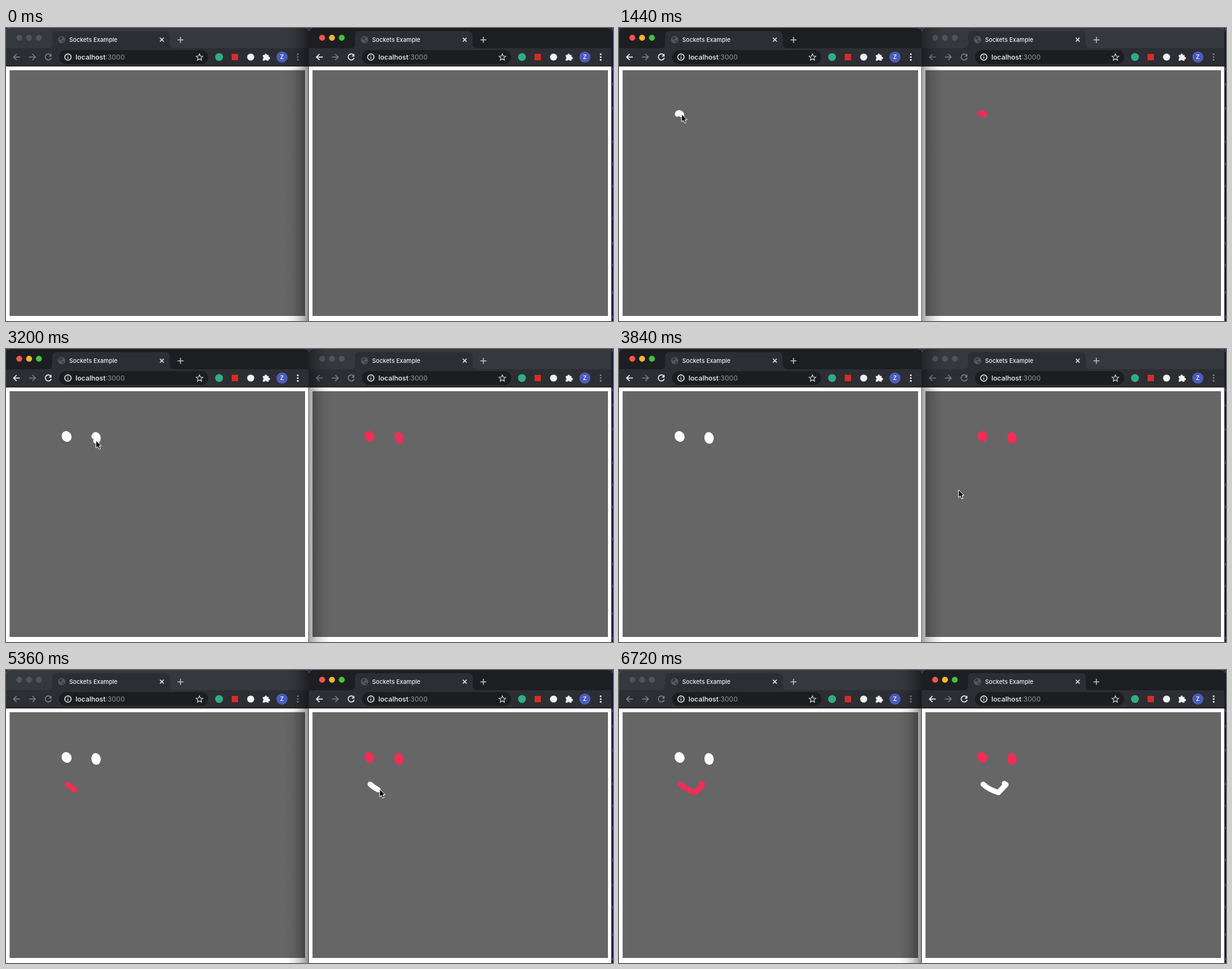
Animation of 960x464 px, one loop 6.8 s. Source, as an HTML page:

```html
<!DOCTYPE html>
<html lang="en">
<head>
<meta charset="utf-8">
<title>Sockets Example</title>
<style>
  html, body { margin: 0; width: 100%; height: 100%; overflow: hidden; background: #17142b; }
  svg { display: block; width: 960px; height: 464px; }
  text { font-family: Inter, Roboto, sans-serif; font-weight: 500; }
  .line { fill: none; stroke-width: 1.5; }
  .mark { fill: none; stroke-width: 8.4; stroke-linecap: round; stroke-linejoin: round; }
</style>
</head>
<body>
<svg id="stage" viewBox="0 0 960 464"></svg>
<script>
const LOOP = 6800, STEP = 80, SHIFT = 479;
const RED = '#f22d56', WHITE = '#fff';
const stage = document.getElementById('stage');

const clamp = v => Math.min(1, Math.max(0, v));
const ease = u => u * u * (3 - 2 * u);
const mix = (a, b, u) => a + (b - a) * u;
const repeat = (n, make) => Array.from({ length: n }, (_, i) => make(i)).join('');

let seed = 7;
const random = () => (seed = seed * 16807 % 2147483647) / 2147483647;

// A scribbled dot: one slanted round that winds into its middle.
function scribble(cx, cy, rx, ry, slant) {
  const n = 24;
  return 'M' + Array.from({ length: n + 1 }, (_, i) => {
    const u = i / n, a = Math.PI * (1.1 + 3 * u);
    const r = Math.min(1, 2.6 * (1 - u));
    const x = cx + r * rx * Math.cos(a);
    const y = cy + r * (ry * Math.sin(a) + slant * Math.cos(a));
    return `${x.toFixed(1)} ${y.toFixed(1)}`;
  }).join('L');
}

// Drawn marks in page coordinates; owner is the window they are drawn in.
const marks = [
  { d: scribble(95.8, 138.5, 3.7, 4.1, 1), from: 1120, to: 2240, owner: 0 },
  { d: scribble(142.4, 140.8, 3.2, 5, .7), from: 2800, to: 3520, owner: 0 },
  { d: 'M97 181Q106 189.5 121 194L133 181.5L130.5 179.8', from: 4880, to: 6400, owner: 1 }
];

// Resting points of the cursor between marks: time, x, y.
const stops = [[80, 420, 440], [800, 89, 134], [2480, 95, 134], [3840, 537, 223], [4240, 570, 172], [6640, 690, 480]];

function windowMarkup(id) {
  const drawn = marks.map(m =>
    `<path class="mark" d="${m.d}" pathLength="1" stroke="${m.owner === id ? WHITE : RED}"/>`).join('');
  const lights = repeat(3, i => `<circle class="light" cx="${21 + 15.5 * i}" cy="15.5" r="4.7"/>`);
  const dots = repeat(3, i => `<circle cx="461.5" cy="${41.7 + 4.4 * i}" r="1.4"/>`);
  return `<g id="win${id}" transform="translate(${id * SHIFT})" clip-path="url(#frame)">
    <rect width="479" height="464" fill="#fff"/>
    <rect class="title" width="479" height="40"/>
    ${lights}
    <path d="M66 32Q73 32 73 25V12Q73 5 80 5H252Q259 5 259 12V25Q259 32 266 32Z" fill="#2d2e33"/>
    <rect y="32" width="479" height="28.5" fill="#2d2e33"/>
    <rect y="59.5" width="479" height="1.3" fill="#1b1c1f"/>
    <circle cx="88" cy="18.5" r="5.7" fill="#55585c"/>
    <path d="M84 16l3-2 3 1-2 3-3 1zM88 21l3-2 1 2-3 2z" fill="#35373b"/>
    <text x="100" y="22" font-size="9.35" fill="#eeeff0">Sockets Example</text>
    <path class="line" d="M243.5 15.5l6 6m0-6l-6 6" stroke="#e4e5e7"/>
    <path class="line" d="M276 14v9.4m-4.7-4.7h9.4" stroke="#b9bbbe"/>
    <path class="line nav" d="M22 46H12m4.8-4.8L12 46l4.8 4.8"/>
    <path class="line" d="M36.5 46h10m-4.8-4.8l4.8 4.8l-4.8 4.8" stroke="#7b7d82"/>
    <path class="line nav" d="M70.7 42.8A4.8 4.8 0 1 0 71.6 47.2"/>
    <path class="fill" d="M72 40.5v4.7h-4.7z"/>
    <rect x="84" y="35" width="236" height="22" rx="11" fill="#1c1d20"/>
    <circle class="line" cx="98" cy="46" r="5" stroke="#e4e5e7"/>
    <path d="M98 45.2v3.6M98 42.8v1.3" stroke="#e4e5e7" stroke-width="1.3"/>
    <text x="110" y="50" font-size="10.9" fill="#f6f7f8">localhost<tspan fill="#92959a" font-weight="400">:3000</tspan></text>
    <path d="M306 41l1.5 3.5 3.8.3-2.9 2.5.9 3.7-3.3-2-3.3 2 .9-3.7-2.9-2.5 3.8-.3z" fill="none" stroke="#d0d2d5" stroke-width="1.1"/>
    <circle cx="337" cy="46" r="6.2" fill="#2fae83"/>
    <rect x="357" y="41" width="10" height="10" fill="#d62d25"/>
    <circle cx="387" cy="46" r="5.6" fill="#f2f2f2"/>
    <path d="M406.2 42.8h3a1.8 1.8 0 1 1 3.4 0h2.8v3a1.8 1.8 0 1 1 0 3.5v2.4h-3a1.8 1.8 0 0 0-3.4 0h-2.8v-2.9a1.8 1.8 0 0 0 0-3.4z" fill="#f2f2f2"/>
    <circle cx="436.5" cy="46" r="8.8" fill="#4c5cbd"/>
    <text x="436.5" y="49.3" font-size="9" fill="#fff" text-anchor="middle">Z</text>
    <g class="fill">${dots}</g>
    <rect x="5.7" y="66.8" width="467.3" height="389.2" fill="#666"/>
    ${drawn}
    <rect class="shade" x="${id ? 0 : 439}" width="40" height="464" fill="url(#shade${id})"/>
    <rect x="478" width="1" height="464" fill="#222327" opacity=".65"/>
  </g>`;
}

// Soft shadow of the window on top, fading with the square of the distance.
const shadow = (id, dark, dir) => `<linearGradient id="shade${id}" ${dir}>` +
  repeat(6, i => `<stop offset="${i / 5}" stop-opacity="${dark * (1 - i / 5) ** 2}"/>`) + '</linearGradient>';

stage.innerHTML = `<defs>
    <clipPath id="frame"><path d="M0 464V6Q0 0 6 0H473Q479 0 479 6V464Z"/></clipPath>
    ${shadow(0, .46, 'x1="1" x2="0"')}${shadow(1, .36, '')}
  </defs>
  <rect width="960" height="464" fill="#17133c"/>
  <rect x="470" width="18" height="8" fill="#27207c"/>
  ${repeat(12, i => `<rect x="958.6" y="${i * 40 + random() * 25}" width="1.4" height="4" fill="#4a4690"/>`)}
  ${windowMarkup(0)}${windowMarkup(1)}
  <path id="cursor" d="M0 0V12.2L2.8 9.6L4.9 14.2L7.1 13.2L5.1 8.8H8.8Z" fill="#000" stroke="#fff" stroke-linejoin="round"/>`;

const wins = [0, 1].map(id => {
  const all = s => [...document.querySelectorAll(`#win${id} ${s}`)];
  return {
    title: all('.title'), shade: all('.shade')[0], lights: all('.light'),
    nav: all('.nav'), fills: all('.fill'), marks: all('.mark')
  };
});
const cursor = document.getElementById('cursor');

// Pen position on a mark, in stage coordinates.
function penAt(i, u) {
  const m = marks[i], path = wins[0].marks[i];
  const p = path.getPointAtLength(path.getTotalLength() * u);
  return [p.x + m.owner * (SHIFT + 2.5), p.y - .8];
}

const route = [
  ...stops,
  ...marks.flatMap((m, i) => [[m.from, ...penAt(i, 0)], [m.to, ...penAt(i, 1)]])
].sort((a, b) => a[0] - b[0]);

const paint = (list, name, value) => list.forEach(e => e.setAttribute(name, value));

// front: window on top with lit buttons; bright: window with active chrome.
function focus(win, front, bright) {
  const off = bright ? '#393a3e' : '#505357';
  const tint = bright ? '#f4f5f6' : '#7f8186';
  paint(win.title, 'fill', bright ? '#1d1e21' : '#35383c');
  win.lights.forEach((e, i) =>
    e.setAttribute('fill', front ? ['#f4554a', '#f8b52c', '#3fc43a'][i] : off));
  paint(win.nav, 'stroke', tint);
  paint(win.fills, 'fill', tint);
  win.shade.style.display = front ? 'none' : '';
}

function tipAt(t) {
  const i = marks.findIndex(m => t >= m.from && t < m.to);
  if (i >= 0) return penAt(i, (t - marks[i].from) / (marks[i].to - marks[i].from));
  const k = route.findIndex(r => r[0] > t);
  if (k < 1) return null;
  const [t0, x0, y0] = route[k - 1], [t1, x1, y1] = route[k];
  const u = ease((t - t0) / (t1 - t0));
  return [mix(x0, x1, u), mix(y0, y1, u)];
}

function draw(t) {
  const front = t >= 880 && t < 4240 ? 0 : 1;
  const bright = t >= 960 && t < 4320 ? 0 : 1;
  wins.forEach((w, id) => {
    focus(w, id === front, id === bright);
    marks.forEach((m, i) => {
      const u = clamp((t - m.from) / (m.to - m.from));
      w.marks[i].style.display = t < m.from ? 'none' : '';
      w.marks[i].setAttribute('stroke-dasharray', u < 1 ? `${Math.max(u, .001)} 2` : 'none');
    });
  });
  const tip = tipAt(t);
  cursor.style.display = tip ? '' : 'none';
  if (tip) cursor.setAttribute('transform', `translate(${tip[0]} ${tip[1]})`);
}

const start = performance.now();
function tick(now) {
  const t = Math.max(0, now - start) % LOOP;
  draw(Math.floor(t / STEP) * STEP);
  requestAnimationFrame(tick);
}
draw(0);
requestAnimationFrame(tick);
</script>
</body>
</html>
```
